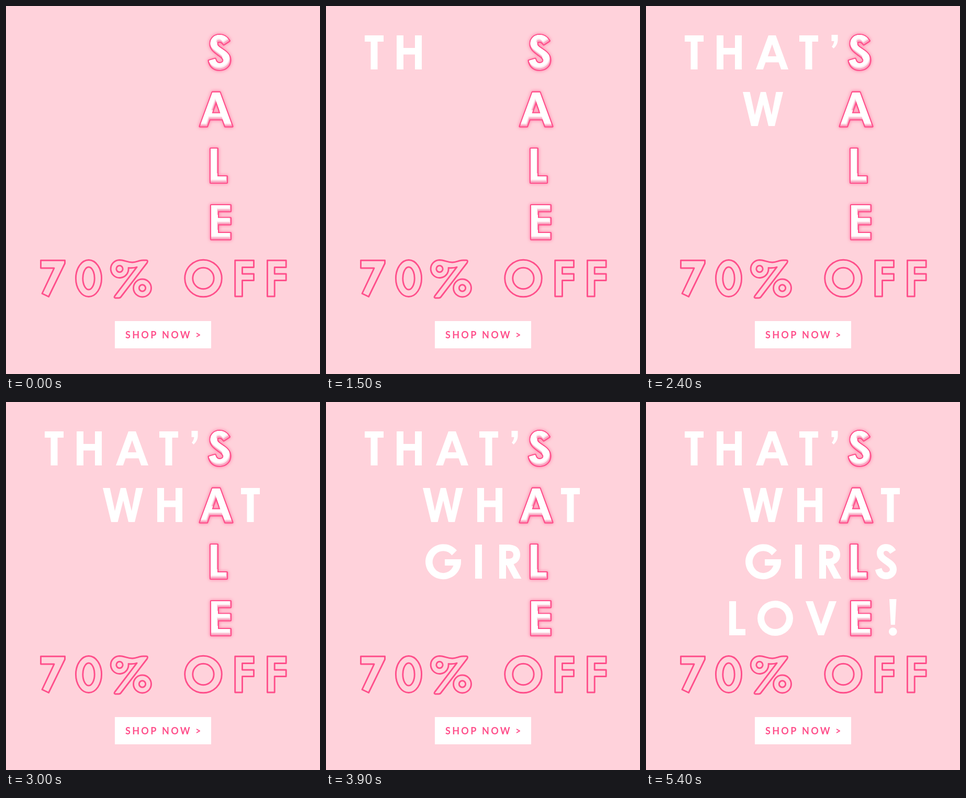
Write an HTML page that moves like this. It is 600x702 px and loops after 5.7 s.

```html
<!DOCTYPE html>
<html lang="en">
<head>
<meta charset="utf-8">
<title>Sale</title>
<style>
  html, body { margin: 0; width: 100%; height: 100%; overflow: hidden; background: #ffd2db; }
  svg { display: block; width: 600px; height: 702px; }
  .word path { fill: #fff; visibility: hidden; }
  .word path.on { visibility: visible; }
  .rim { fill: none; stroke: #ff4f8b; stroke-width: 4.2; stroke-linejoin: round; }
  .glow .rim { filter: drop-shadow(0 0 3px rgba(255, 79, 139, .75)); }
  .low { fill: #f9a9c3; }
  .soft .low { fill: #fab6cb; }
  .mid { fill: #fde6ec; }
  .top { fill: #fff; }
  .offer { fill: none; stroke: #ff4f8b; stroke-width: 2.9; stroke-linejoin: round; }
  .cta { font: 700 18px Lato, sans-serif; letter-spacing: 3.3px; fill: #ff4f8b; }
</style>
</head>
<body>
<svg viewBox="0 0 600 702" role="img" aria-label="That's what girls love! Sale, 70% off">
  <defs id="clips"></defs>
  <g class="word" id="words"></g>
  <g id="sale"></g>

  <g class="offer">
    <path d="M66.5 485.3H112.5V491L81.5 554.5L69 548.5L92 500H66.5Z"/>
    <ellipse cx="158" cy="519.5" rx="24.6" ry="35"/>
    <ellipse cx="158" cy="519.5" rx="11.2" ry="21.5"/>
    <path d="M217 484.5C226 484.5 232 489.5 242 489C250 488.5 255 485 262 485H268C271 485 271 487.5 269.5 490L219.5 555Q218 557 215.5 557H209Q205.5 556.5 208 553L250 498C245 500 240 500 234 499.5A17 17 0 1 1 217 484.5Z"/>
    <circle cx="217" cy="501.5" r="6.2"/>
    <circle cx="260.5" cy="538" r="17"/>
    <circle cx="260.5" cy="538" r="6.2"/>
    <circle cx="377" cy="519.5" r="35.3"/>
    <circle cx="377" cy="519.5" r="20.2"/>
    <path id="f" d="M437.7 485.3H473.5V498.5H451.5V511H473.5V523.5H451.5V554H437.7Z"/>
    <use href="#f" x="61.7"/>
  </g>

  <rect x="208" y="601" width="184" height="52" fill="#fff"/>
  <text class="cta" y="634"><tspan x="228">SHOP</tspan> <tspan x="298">NOW</tspan> <tspan x="362">&gt;</tspan></text>
</svg>
<script>
const STEP = 300, LOOP = 5700, FIRST = 4;

// Glyph outlines, cap height 65, origin at the top left.
const glyphs = {
  T: 'M0 0H36V12H24.5V65H11.5V12H0Z',
  H: 'M0 0H13V24H35V0H48V65H35V36.5H13V65H0Z',
  A: 'M24 0H38L62 65H48.3L43.5 51.5H18.5L13.7 65H0ZM31 17L22.8 40H39.2Z',
  '’': 'M0 -1H12V8C12 15 9 20.5 4 25L0.5 21.5C3 18.5 4.5 15.5 5 11H0Z',
  W: 'M0 0H13.5L23 44L34 0H44L55 44L63.5 0H77L61 65H49L39 24L28.5 65H16Z',
  G: 'M60 11A34 33.5 0 1 0 68 31V28H37V40H53.5A20.5 21 0 1 1 50.5 20.5Z',
  I: 'M0 0H13V65H0Z',
  R: 'M0 0H15C32 0 40 7 40 19C40 28 36 34 27.5 37.5L42.5 65H28L14 39H13V65H0ZM13 12V27H17.5C24 27 27 24.5 27 19.5C27 14.5 24 12 18 12Z',
  S: 'M39.4 10.4C35 3 29 -1 20.5 -1C10 -1 3 6.5 3 16C3 26 10 31 17 36.2C23 40.7 28 43.5 28 47.5C28 51 25 53 20.5 53C16 53 14 50.5 12.2 44.7L0 48.3C2 59 9 66 20.5 66C32 66 41 58.5 41 47C41 37 33.5 31.5 25 25.8C19.5 22 16 20 16 16C16 13.5 17.5 12 20.5 12C24 12 26 14 28.6 17.6Z',
  L: 'M0 0H13V53H31V65H0Z',
  O: 'M0 32.5A34 33.5 0 0 1 68 32.5A34 33.5 0 0 1 0 32.5ZM13 32.5A21 20.5 0 0 0 55 32.5A21 20.5 0 0 0 13 32.5Z',
  V: 'M0 0H14L29.5 44L45 0H59L35 65H24Z',
  '!': 'M1 -4H14.5L11.8 45H3.8ZM0 58A7.8 7.8 0 0 1 15.6 58A7.8 7.8 0 0 1 0 58Z',
  E: 'M0 0H37V11.5H13V24.5H37V36.5H13V53H37V65H0Z'
};

const $ = id => document.getElementById(id);
const words = $('words'), sale = $('sale');

function add(parent, tag, attrs) {
  const el = document.createElementNS('http://www.w3.org/2000/svg', tag);
  for (const key in attrs) el.setAttribute(key, attrs[key]);
  return parent.appendChild(el);
}

const letters = [];
let slot = FIRST - 1;

// The apostrophe arrives together with the letter before it.
function type(y, text, xs) {
  [...text].forEach((c, i) => {
    if (c !== '’') slot++;
    const el = add(words, 'path', { d: glyphs[c], transform: `translate(${xs[i]} ${y})` });
    letters.push({ el, slot });
  });
}
type(56, 'THAT’', [74, 135, 210, 293, 354.5]);
type(164, 'WHT', [185, 289, 449]);
type(272, 'GIRS', [190, 285, 331, 438]);
type(380, 'LOV!', [159, 213, 305, 464]);

function bevel(c, x, y) {
  const d = glyphs[c], id = 'clip' + c;
  add(add($('clips'), 'clipPath', { id }), 'path', { d });
  const g = add(sale, 'g', { transform: `translate(${x} ${y})` });
  add(g, 'path', { d, class: 'rim' });
  const face = add(g, 'g', { 'clip-path': `url(#${id})` });
  add(face, 'path', { d, class: 'low' });
  add(face, 'path', { d, class: 'mid', transform: 'translate(-1 -3.5)' });
  add(face, 'path', { d, class: 'top', transform: 'translate(-2 -6)' });
}
bevel('S', 387.5, 56);
bevel('A', 370.5, 164.7);
bevel('L', 391, 272);
bevel('E', 392, 380);

function draw(now) {
  const n = Math.floor(now % LOOP / STEP);
  sale.classList.toggle('soft', n === 1);
  sale.classList.toggle('glow', n !== 2);
  for (const { el, slot } of letters) el.classList.toggle('on', n >= slot);
}

let start;
function tick(now) {
  start ??= now;
  draw(now - start);
  requestAnimationFrame(tick);
}
draw(0);
requestAnimationFrame(tick);
</script>
</body>
</html>
```
